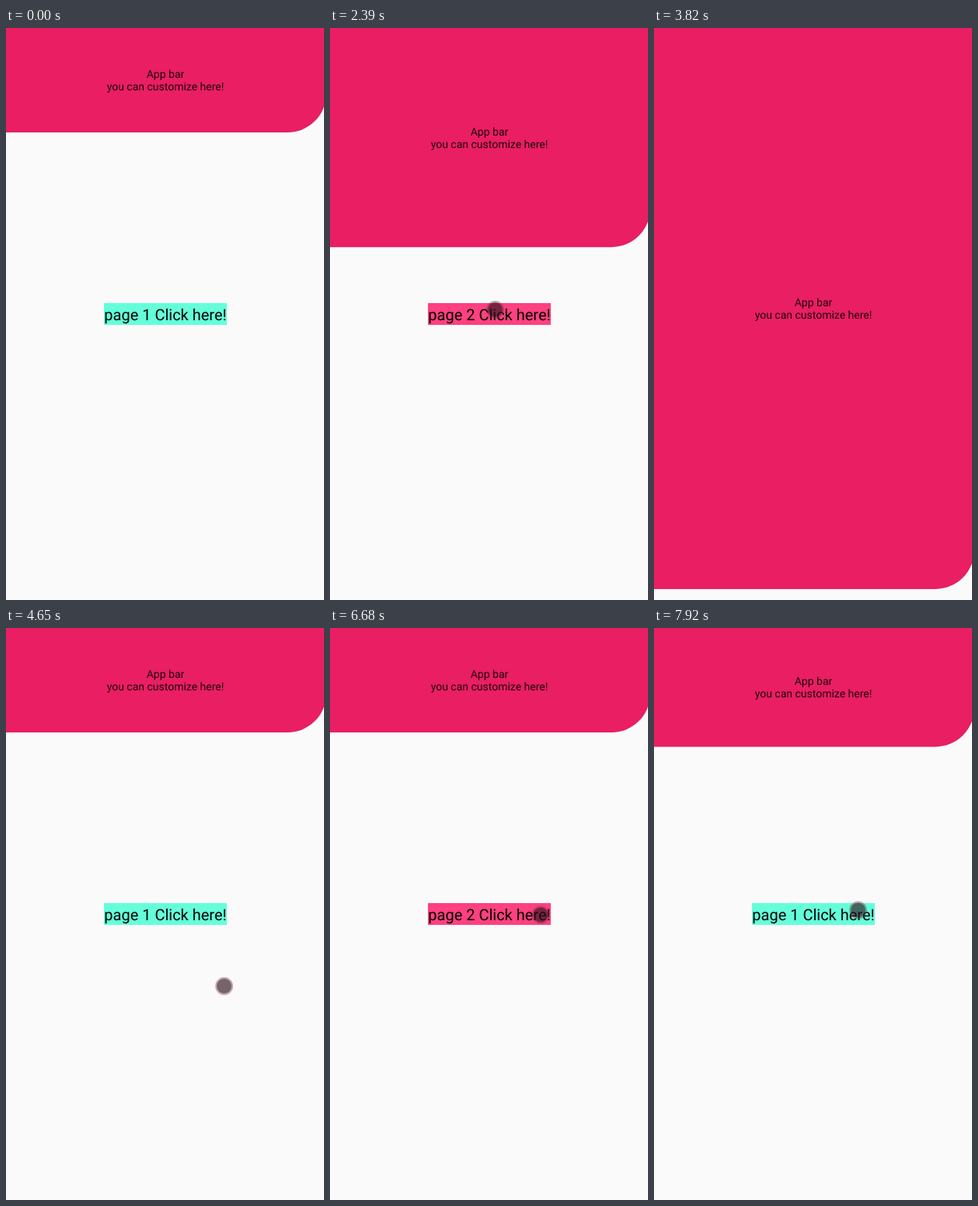
Write an HTML page that moves like this. It is 409 px wide and 734 px high and loops after 8000 ms.

```html
<!DOCTYPE html>
<html lang="en">
<head>
<meta charset="utf-8">
<title>Expanding app bar</title>
<style>
  html, body { margin: 0; width: 100%; height: 100%; overflow: hidden; background: #fafafa; }
  svg { display: block; width: 409px; height: 734px; }
  text { font-family: Roboto, sans-serif; text-anchor: middle; text-rendering: geometricPrecision; }
  #label { font-size: 20px; }
  #title { font-size: 14px; fill-opacity: .87; }
</style>
</head>
<body>
<svg viewBox="0 0 409 734">
  <rect id="chip" x="126" y="353" width="158" height="28"/>
  <text id="label" x="205" y="375"></text>
  <path id="bar" fill="#e91e63"/>
  <g id="title">
    <text x="205" y="64">App bar</text>
    <text x="205" y="80">you can customize here!</text>
  </g>
  <g id="dot">
    <circle r="11.5" fill="rgba(110,50,65,.4)"/>
    <circle r="9.5" fill="rgba(15,5,10,.42)"/>
  </g>
</svg>
<script>
const LOOP = 8000, LAST = 7920;
const LOW = 134, HIGH = 734, RADIUS = 50;
const SLIDE = 600, GLIDE = 400;
const pages = ['#64ffda', '#ff4081'];
// Each tap: when the bar starts to expand and to contract
const taps = [[1505, 2117.5], [3339, 3951], [4796, 5408.5], [6809, 7453.5]];
// Pointer glides: start time and destination
const home = [338, 748];
const glides = [
  [490, 212.5, 361.5], [3420, ...home], [4380, 262, 366],
  [4860, 425, 300], [6020, 271, 368], [6690, 262.5, 362]
];

const $ = id => document.getElementById(id);
const clamp = v => Math.min(1, Math.max(0, v));
const smooth = p => p * p * (3 - 2 * p);

// The CSS "ease" curve: cubic-bezier(.25, .1, .25, 1)
function ease(x) {
  if (x <= 0 || x >= 1) return clamp(x);
  let lo = 0, hi = 1, s;
  for (let i = 0; i < 24; i++) {
    s = (lo + hi) / 2;
    if (.75 * s * (1 - s) + s ** 3 < x) lo = s; else hi = s;
  }
  return .3 * (1 - s) ** 2 * s + 3 * (1 - s) * s * s + s ** 3;
}

function pointer(t) {
  let [x, y] = home;
  for (const [start, toX, toY] of glides) {
    const k = smooth(clamp((t - start) / GLIDE));
    x += (toX - x) * k;
    y += (toY - y) * k;
  }
  return [x, y];
}

function draw(t) {
  let open = 0, page = 0;
  for (const [out, back] of taps) {
    open += ease((t - out) / SLIDE) - ease((t - back) / SLIDE);
    if (t >= back) page = 1 - page;
  }
  const h = LOW + (HIGH - LOW) * open;
  $('bar').setAttribute('d',
    `M0 0H412V${h - RADIUS}a${RADIUS} ${RADIUS} 0 0 1 ${-RADIUS} ${RADIUS}H0Z`);
  $('title').setAttribute('transform', `translate(0 ${(h - LOW) / 2})`);
  $('chip').setAttribute('fill', pages[page]);
  $('label').textContent = `page ${page + 1} Click here!`;
  $('dot').setAttribute('transform', `translate(${pointer(t)})`);
}

function tick() {
  draw(Math.min(performance.now() % LOOP, LAST));
  requestAnimationFrame(tick);
}
tick();
</script>
</body>
</html>
```
